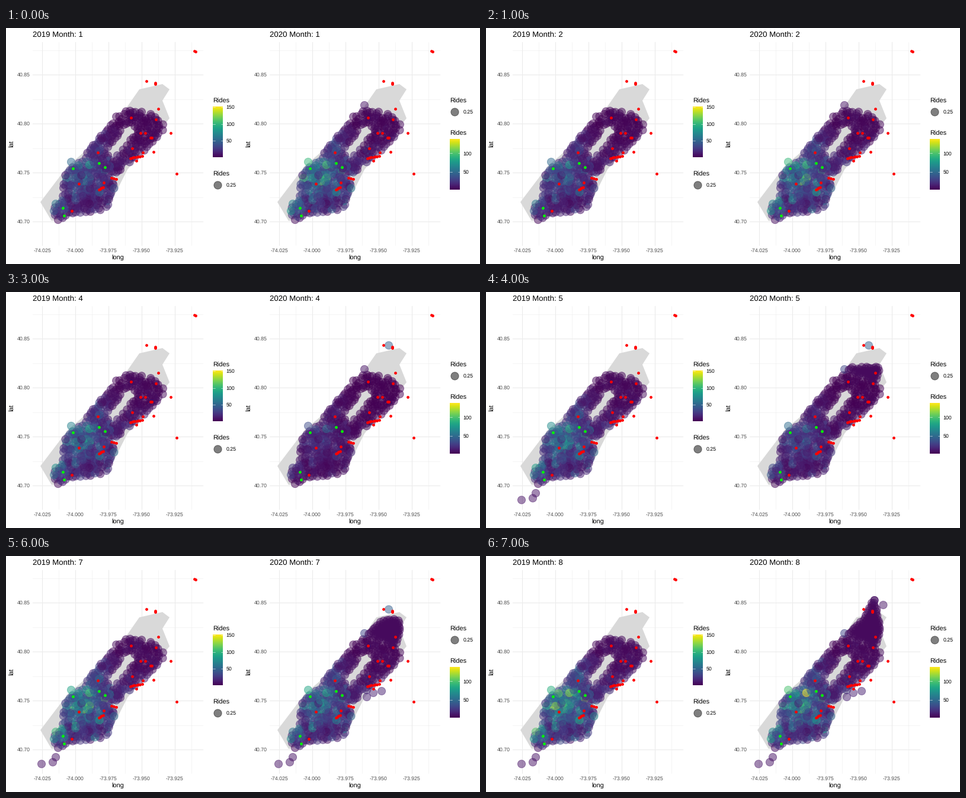
Recreate the animation shown at these times as a matplotlib script. Size 800 by 400 pixels, loop 8000 ms.

```python
import numpy as np
import matplotlib.pyplot as plt
from matplotlib.animation import FuncAnimation
from matplotlib.path import Path

W, H, DPI = 800, 400, 100
PX = 72 / DPI  # points per pixel
plt.rcParams["font.family"] = "Liberation Sans"
plt.rcParams["text.hinting"] = "none"

# Outlines in panel pixels, y downwards
ISLAND = [(58, 295), (105, 233), (150, 195), (200, 140), (225, 104), (264, 95),
          (276, 104), (264, 123), (276, 153), (205, 240), (172, 305),
          (115, 318), (77, 327)]
SERVED = [(87, 327), (79, 308), (96, 288), (95, 254), (137, 211), (184, 151),
          (206, 138), (244, 144), (271, 166), (237, 206), (203, 233),
          (178, 252), (184, 264), (178, 296), (163, 308), (110, 317)]
PARK = [(165, 211), (207, 162), (224, 174), (181, 222)]
NORTH = [(212, 132), (237, 106), (250, 80), (256, 74), (263, 105), (265, 126),
         (260, 150), (240, 142)]

# Markers: single places, and rows given as start, end, count
RED = [(237, 90), (257, 137), (211.5, 152), (253.5, 155), (278, 178),
       (213, 204), (249.5, 209.5), (155.5, 211), (231, 211), (220, 224.5),
       (288.5, 247), (165.5, 261.5), (123.5, 264), (111, 310)]
RED_ROWS = [((318.5, 39), (320, 40), 2), ((252, 93), (252, 95), 2),
            ((227, 177.5), (235.5, 177.5), 2), ((244, 185.5), (246, 185.5), 2),
            ((210, 220.5), (230, 217), 7), ((178, 254), (186.5, 255.5), 3),
            ((157, 274), (164, 270), 4)]
GREEN = [(157, 229), (167.5, 236), (113, 237.5), (96, 304.5), (98, 318)]

# Busy stations and their rides relative to the month's level
BUSY = [(167, 241), (110, 227), (84, 298), (81, 310)]
BUSY_SHARE = {2019: [1.6, 1.2, 1.4, 1.0], 2020: [1.5, 1.5, 1.0, 1.2]}
SCALE = {2019: (1, 152), 2020: (1.5, 139)}


def level(year, month):
    """Rides of the central area: steady growth, or a spring slump."""
    if year == 2019:
        return 44 + 6 * max(0, month - 2)
    return 62 if month < 3 else 22 + 11 * abs(month - 4)


def spread(outline, count, gap, rng, hole=None):
    """Random points inside an outline, none closer than gap."""
    shape = Path(outline)
    lo, hi = np.min(outline, axis=0), np.max(outline, axis=0)
    points = []
    for p in rng.uniform(lo, hi, (8000, 2)):
        inside = shape.contains_point(p)
        if hole and Path(hole).contains_point(p):
            inside = False
        if inside and all(np.hypot(*(p - q)) > gap for q in points):
            points.append(p)
        if len(points) == count:
            break
    return np.array(points)


def bump(p, x, y, size):
    return np.exp(-((p[:, 0] - x) ** 2 + (p[:, 1] - y) ** 2) / size ** 2)


def demand(p):
    """Relative use of a place, about 1 at the centre."""
    south = 1 / (1 + np.exp((212 - p[:, 1]) / 12))
    return (0.06 + 0.22 * south + 0.6 * bump(p, 130, 248, 35)
            + 0.22 * bump(p, 158, 195, 25) + 0.25 * bump(p, 92, 300, 15))


rng = np.random.default_rng(12)
core = spread(SERVED, 430, 3.4, rng, PARK)
share = demand(core) * np.exp(rng.normal(-0.1, 0.45, len(core)))
north = spread(NORTH, 110, 3.4, rng)
MID = len(core) * 2 // 3  # busy stations lie partly under later ones


def stations(year, month):
    """Places and ride counts for one month."""
    jitter = np.random.default_rng(year * 12 + month).normal(0, 0.15, len(core))
    rides = np.insert(share * np.exp(jitter), MID, BUSY_SHARE[year])
    places = np.insert(core, MID, BUSY, axis=0)
    groups = [(places, rides * level(year, month))]

    def add(points, value):
        groups.append((np.array(points), np.full(len(points), value)))

    if month >= (5 if year == 2019 else 6):
        add([(60, 352.5), (79, 349.5), (84, 341)], 8)
    if year == 2020:
        add([(205, 131)], 8 if month < 5 else 30)
        if month >= 5:
            top = 177 - 10 * month if month < 8 else 0
            add(north[north[:, 1] > top], 5)
        if month >= 6:
            add([(209, 239), (220, 232), (234, 229)], 14)
        if month == 8:
            add([(270.5, 83), (255.5, 75)], 9)
        elif month >= 4:
            add([(246, 90.5)], 42)
    return [np.concatenate(g) for g in zip(*groups)]


fig = plt.figure(figsize=(W / DPI, H / DPI), dpi=DPI, facecolor="white")
ax = fig.add_axes([0, 0, 1, 1])


def dots(points, width, color, zorder, edge=0.0):
    x, y = np.transpose(points)
    return ax.scatter(x, y, s=(width * PX) ** 2, color=color, zorder=zorder,
                      linewidths=edge * PX)


def bubbles(points, color, zorder):
    return dots(points, 13.2, color, zorder, edge=0.9)


def label(x, y, text, size=11, color="black", **kw):
    return ax.text(x, y, text, fontsize=size * PX, color=color,
                   va="baseline", **kw)


def small(x, y, text, ha="left", color="black"):
    label(x, y + 3.2, text, 8.8, color, ha=ha)


def rule(x, y, width, color="#EBEBEB", zorder=1):
    ax.plot(x, y, color=color, lw=width * PX, zorder=zorder)


def grid(ox):
    for i in range(5):
        x = ox + 61 + 55.9 * i
        rule([x, x], [24, 368], 1.1)
        rule([x + 28, x + 28], [24, 368], 0.55)
        small(x, 377, f"{-74.025 + 0.025 * i:.3f}", "center", "#4D4D4D")
    for i in range(4):
        y = 79 + 83 * i
        rule([ox + 45, ox + 332], [y, y], 1.1)
        rule([ox + 45, ox + 332], [y - 41.5, y - 41.5], 0.55)
        small(ox + 41, y, f"{40.85 - 0.05 * i:.2f}", "right", "#4D4D4D")
    label(ox + 189, 393, "long", ha="center")
    ax.text(ox + 10, 196, "lat", fontsize=11 * PX, rotation=90,
            ha="center", va="center")


def colour_key(x, y, ticks, limits):
    """Gradient bar with its title; y is the top of the bar."""
    height, width = 86, 17
    low, high = limits
    label(x, y - 6, "Rides")
    ax.imshow(np.linspace(1, 0, 256)[:, None], cmap="viridis", aspect="auto",
              extent=(x, x + width, y + height, y), zorder=2)
    for t in ticks:
        ty = y + height * (high - t) / (high - low)
        for left in (x, x + width - 3.5):
            rule([left, left + 3.5], [ty, ty], 0.5, "white", 3)
        small(x + 22.5, ty, str(t))


def size_key(x, y):
    label(x, y, "Rides")
    bubbles([(x + 8, y + 14.6)], (0, 0, 0, 0.5), 2)
    small(x + 22.5, y + 14.6, "0.25")


red = np.vstack([RED] + [np.linspace(*row) for row in RED_ROWS])
panels = []
for year, ox in ((2019, 0), (2020, 400)):
    shift = np.array([ox, 0])
    grid(ox)
    ax.fill(*np.transpose(ISLAND + shift), color="#D9D9D9", lw=0, zorder=2)
    cloud = bubbles([(0, 0)], "white", 4)
    dots(red + shift - (0.5, 0), 4.8, "#FF0000", 5)
    dots(GREEN + shift - (0.5, 0), 4.8, "#00FF00", 6)
    panels.append((year, shift, cloud, label(ox + 45, 15, "", 13.2)))

colour_key(349, 133, (150, 100, 50), SCALE[2019])
size_key(349, 251)
size_key(749, 127)
colour_key(749, 188, (100, 50), SCALE[2020])

ax.set_xlim(0, W)
ax.set_ylim(H, 0)
ax.axis("off")


def update(i):
    month = i + 1
    for year, shift, cloud, title in panels:
        places, rides = stations(year, month)
        low, high = SCALE[year]
        colors = plt.cm.viridis(np.clip((rides - low) / (high - low), 0, 1))
        colors[:, 3] = 0.5
        cloud.set_offsets(places + shift)
        cloud.set_facecolor(colors)
        cloud.set_edgecolor(colors)
        title.set_text(f"{year} Month: {month}")
    return [artist for panel in panels for artist in panel[2:]]


anim = FuncAnimation(fig, update, frames=8, interval=1000, repeat=True,
                     repeat_delay=0, blit=False)
plt.show()
```
